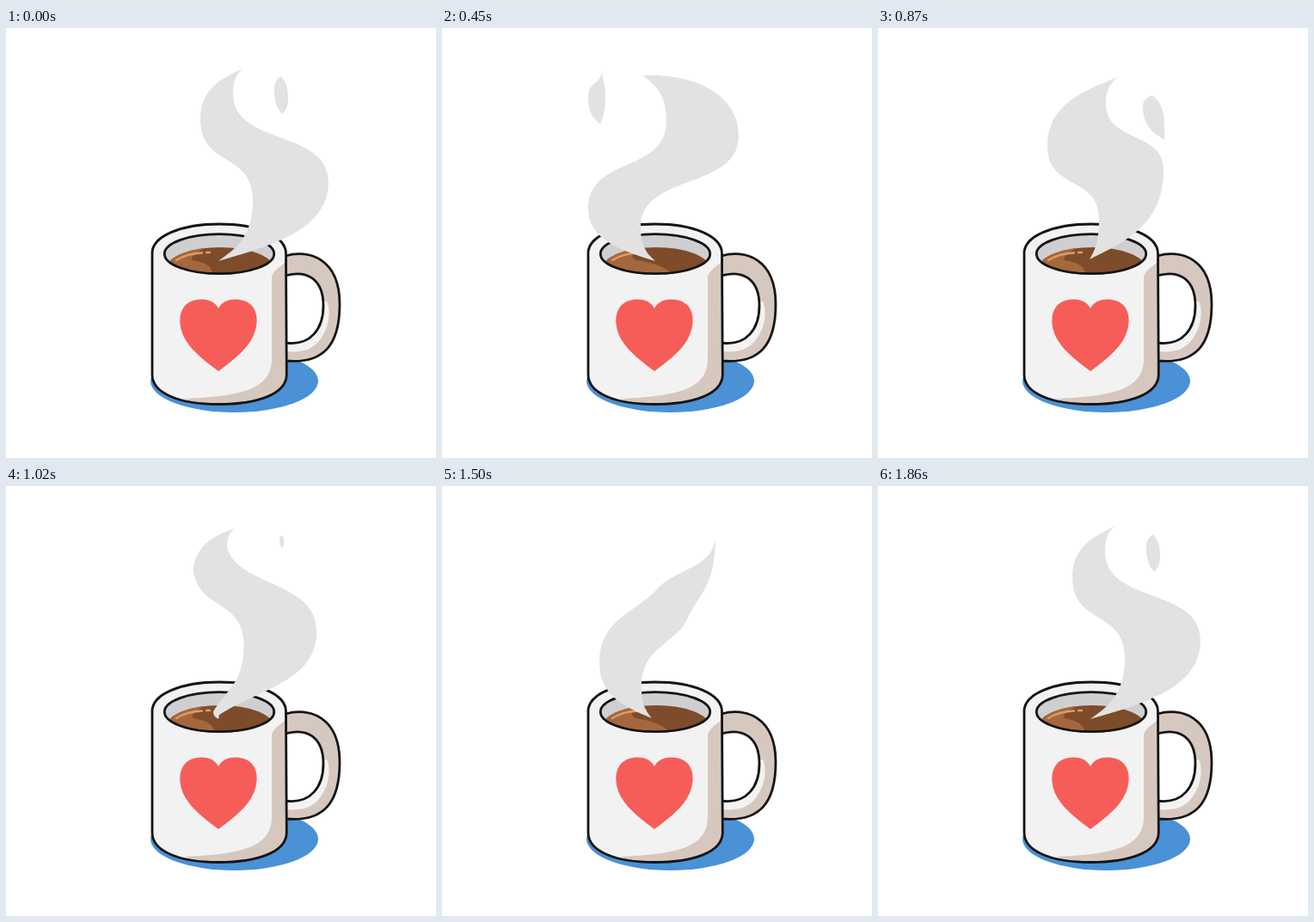
Recreate the animation shown at these times as an HTML page. Size 500 by 500 pixels, loop 1890 ms.

```html
<!DOCTYPE html>
<html lang="en">
<head>
<meta charset="utf-8">
<title>Hot coffee mug</title>
<style>
  html, body { margin: 0; width: 100%; height: 100%; overflow: hidden; background: #fff; }
  svg { display: block; width: 100vw; height: 100vh; }
  .line { fill: none; stroke: #141414; stroke-width: 2.8; stroke-linejoin: round; }
  .clay { fill: #f2f2f2; }
  .shade { fill: #d6c8bf; }
  .steam { fill: #e2e2e2; }
</style>
</head>
<body>
<svg viewBox="0 0 500 500">
  <defs>
    <path id="cup" d="M170 264C168 241 206 228 248 228S327 241 325.5 264L326.3 403C326 426 292 437.5 247 437.5S170 425 170 403Z"/>
    <path id="grip" d="M325 265C352 257 388 268 388 321C388 368 370 391 325 387V366C354 370 369 350 369 323C369 291 349 281 325 288Z"/>
    <ellipse id="mouth" cx="248" cy="262.7" rx="63.7" ry="23"/>
    <clipPath id="inCup"><use href="#cup"/></clipPath>
    <clipPath id="inGrip"><use href="#grip"/></clipPath>
    <clipPath id="inMouth"><use href="#mouth"/></clipPath>
  </defs>

  <ellipse cx="265.5" cy="410.5" rx="97.5" ry="36.5" fill="#4a91d6"/>

  <use href="#grip" class="shade"/>
  <path clip-path="url(#inGrip)" class="clay" d="M366 318H373C378 328 377 352 360 368C349 377 337 377 325 376V364H350L366 345Z"/>
  <use href="#grip" class="line"/>

  <use href="#cup" class="clay"/>
  <path clip-path="url(#inCup)" class="shade" d="M328 268C322 278 309 280 309 292V384C309 418 280 428 208 431L230 442H330Z"/>
  <use href="#cup" class="line"/>

  <use href="#mouth" fill="#cfcfd1"/>
  <g clip-path="url(#inMouth)">
    <clipPath id="inCoffee"><ellipse cx="249" cy="279" rx="62" ry="24"/></clipPath>
    <g clip-path="url(#inCoffee)">
      <path d="M180 250H320V290H180Z" fill="#7e4c2a"/>
      <path id="glow" d="M130 250H240C224 260 212 267 217 270C228 273 240 274 240 288H130Z" fill="#a5673c"/>
    </g>
    <path d="M198 270Q211 262 228 261.5M233 261H237" fill="none" stroke="#e09b66" stroke-width="2.4" stroke-linecap="round"/>
  </g>
  <use href="#mouth" class="line"/>

  <path fill="#f65d59" d="M247 326C240 313 222 314 213 319C199 327 200 348 209 363C218 378 235 390 247 399C259 390 276 378 285 363C294 348 295 327 281 319C272 314 254 313 247 326Z"/>

  <path id="plume" class="steam"/>
  <path id="leftPuff" class="steam"/>
  <path id="rightPuff" class="steam"/>
</svg>

<script>
const LOOP = 1890, STEP = 30, WAVE = 930, BOW = .6;

const mix = (a, b, k) => a + (b - a) * k;
const mixPoint = (p, q, k) => ({ x: mix(p.x, q.x, k), y: mix(p.y, q.y, k) });

// One letter per node: v vertical, h horizontal, s smooth, c corner, = repeats the node before.
function shape(kinds, ...xy) {
  const nodes = [];
  for (const kind of kinds) {
    nodes.push(kind === "=" ? nodes.at(-1) : { kind, x: xy.shift(), y: xy.shift() });
  }
  const n = nodes.length, at = i => nodes[(i + n) % n];

  // Handle of p on the way to q; back is the node on p's other side.
  function handle(p, q, back) {
    if (p.kind === "v") return { x: p.x, y: mix(p.y, q.y, BOW) };
    if (p.kind === "h") return { x: mix(p.x, q.x, BOW), y: p.y };
    if (p.kind === "c") return null;
    const dx = q.x - back.x, dy = q.y - back.y;
    const k = .35 * Math.hypot(q.x - p.x, q.y - p.y) / Math.hypot(dx, dy);
    return { x: p.x + dx * k, y: p.y + dy * k };
  }

  return nodes.flatMap((p, i) => {
    const q = at(i + 1), h1 = handle(p, q, at(i - 1)), h2 = handle(q, p, at(i + 2));
    return [p, h1 || mixPoint(p, h2 || q, .5), h2 || mixPoint(q, h1 || p, .5), q];
  });
}
const speck = (x, y) => shape("c===", x, y);

// The wave in the steam: sway, hook, curl, flame, and round again.
const sway = shape("c==vv=cvv", 247,271, 287,200, 226,106, 275,47, 264,76, 375,179);
const newSway = shape("c==vv=cvv", 246,269, 257,222, 197,138, 279,57, 265,88, 332,165);
const hook = shape("c==vc=h=v", 247,270, 259,195, 172,99, 250,69, 338,160);
const lateHook = shape("vcvvc=h=v", 250,252, 246,270, 223,236, 245,135, 193,77, 236,57, 320,138);
const curl = shape("vcvvc=h=v", 231,232, 248,271, 170,210, 261,108, 233,55, 242,55, 345,125);
// The flame has two node orders: one ends a wave, the other starts the next.
const flamePoints = [232,234, 244,270, 183,206, 250,120, 318,57, 285,155];
const flame = shape("vcvsv===s", ...flamePoints);
const nextFlame = shape("c===vsvsv", ...flamePoints.slice(2), ...flamePoints.slice(0, 2));

const leftLow = shape("vvcv", 186,156, 214,205, 203,240, 180,187);
const leftMid = shape("vvcv", 182,121, 195,187, 186,220, 172,172);
const leftTop = shape("vvcv", 186,47, 190,78, 184,112, 170,81);
const rightLow = shape("cvcv", 319,78, 333,112, 333,130, 308,91);
const rightTop = shape("cvcv", 320,56, 328,82, 321,100, 312,71);

const tracks = {
  plume: [
    [0, sway], [240, hook], [450, curl], [600, flame], [600, nextFlame], [870, newSway],
    [960, sway], [1200, lateHook], [1365, curl], [1500, flame], [1500, nextFlame], [1770, newSway],
    [1860, sway]
  ],
  leftPuff: [
    [90, speck(214, 226)], [240, leftLow], [450, leftTop], [540, speck(182, 54)],
    [1050, speck(200, 215)], [1200, leftMid], [1365, leftTop], [1455, speck(182, 54)]
  ],
  rightPuff: [
    [0, rightTop], [90, speck(321, 58)],
    [720, speck(314, 112)], [870, rightLow], [960, rightTop], [1050, speck(321, 58)],
    [1620, speck(314, 112)], [1770, rightLow], [1860, rightTop]
  ]
};

function poseAt(keys, t) {
  const i = keys.findLastIndex(([time]) => time <= t);
  if (i < 0) return keys[0][1];
  const [from, a] = keys[i], [to, b] = keys[i + 1] || [Infinity, a];
  return a.map((p, j) => mixPoint(p, b[j], (t - from) / (to - from)));
}

function outline(points) {
  const xy = points.map(p => p.x.toFixed(2) + " " + p.y.toFixed(2));
  let d = "M" + xy[0];
  for (let i = 0; i < xy.length; i += 4) d += "C" + xy.slice(i + 1, i + 4).join(" ");
  return d + "Z";
}

const find = id => document.getElementById(id);

function draw() {
  const t = Math.floor(performance.now() % LOOP / STEP) * STEP;
  for (const id in tracks) find(id).setAttribute("d", outline(poseAt(tracks[id], t)));
  // The lit coffee leans with the steam, hinged near the back wall.
  const lean = .6 * (1 - Math.cos(2 * Math.PI * t / WAVE));
  find("glow").setAttribute("transform", `matrix(1 0 ${lean} 1 ${-262 * lean} 0)`);
  requestAnimationFrame(draw);
}
draw();
</script>
</body>
</html>
```
